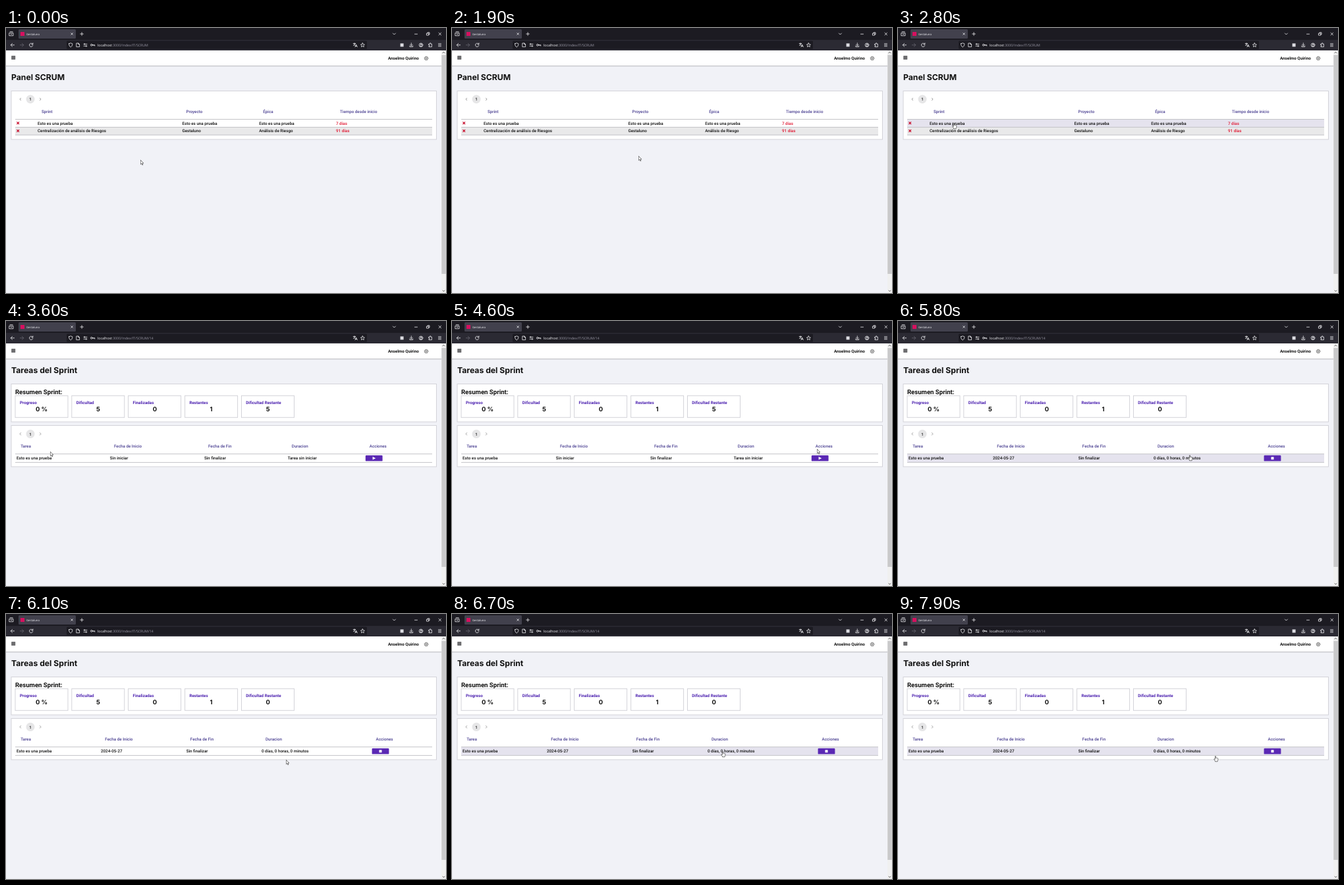
These frames come from a looping animation (668 px wide and 402 px high, 8 s). An HTML page:

```html
<!DOCTYPE html>
<html lang="es">
<head>
<meta charset="utf-8">
<title>Panel SCRUM</title>
<style>
html, body { margin: 0; width: 100%; height: 100%; overflow: hidden; background: #f1f2f7; }
svg { display: block; }
text { font: 500 6.26px Roboto, sans-serif; fill: #111; text-rendering: geometricPrecision; white-space: pre; }
.ui { font: 400 5.24px "Open Sans", sans-serif; fill: #9a99a6; }
.ui .on, .tab { fill: #fbfbfe; }
.tab { font: 400 4.2px "Open Sans", sans-serif; }
.title { font: 700 12.2px Inter, sans-serif; }
.sub { font: 700 9.6px Roboto, sans-serif; }
.head text, text.head { fill: #4b4192; }
.label { font-weight: 700; fill: #4d22b0; }
.num { font: 700 9.4px Inter, sans-serif; text-anchor: middle; }
.late { fill: #e0142f; }
.box { fill: #fff; stroke: #d3d3d9; }
.rule { stroke: #c4c4c8; fill: none; }
.icon { fill: none; stroke: #fbfbfe; stroke-width: .75; stroke-linecap: round; stroke-linejoin: round; }
.dim { stroke: #6b6a75; }
.hot { fill: #e5e3ee; }
.btn { fill: #5a28b4; }

.list, .before, .after, .task, .row1, .row2, .row3, .hand, .arrow, .mouse { animation: 8s step-end infinite; }
.list { animation-name: list; }
.task { animation-name: task; }
.before { animation-name: before; }
.after { animation-name: after; }
.row1 { animation-name: row1; }
.row2 { animation-name: row2; }
.row3 { animation-name: row3; }
.hand { animation-name: hand; }
.arrow { animation-name: arrow; }
.mouse { animation-name: mouse; }

@keyframes list { 0% { visibility: visible } 38.75%, 100% { visibility: hidden } }
@keyframes task { 0% { visibility: hidden } 38.75%, 100% { visibility: visible } }
@keyframes before { 0%, 65% { visibility: hidden } 38.75% { visibility: visible } 100% { visibility: hidden } }
@keyframes after { 0% { visibility: hidden } 65%, 100% { visibility: visible } }
@keyframes row1 { 0%, 38.75%, 100% { opacity: 0 } 32.5% { opacity: 1 } }
@keyframes row2 { 0%, 32.5%, 100% { opacity: 0 } 30% { opacity: 1 } }
@keyframes row3 {
  0%, 56.25%, 75%, 95% { opacity: 0 }
  50%, 61.25%, 78.75%, 96.25%, 100% { opacity: 1 }
}
@keyframes hand {
  0%, 38.75%, 56.25%, 75%, 95% { opacity: 0 }
  30%, 50%, 61.25%, 78.75%, 96.25%, 100% { opacity: 1 }
}
@keyframes arrow {
  0%, 38.75%, 56.25%, 75%, 95% { opacity: 1 }
  30%, 50%, 61.25%, 78.75%, 96.25%, 100% { opacity: 0 }
}
@keyframes mouse {
  0% { transform: translate(204px, 200px) }
  1.25% { transform: translate(204px, 200px); animation-timing-function: steps(3) }
  5% { transform: translate(297px, 200px) }
  10% { transform: translate(297px, 200px); animation-timing-function: steps(2) }
  12.5% { transform: translate(298px, 191px) }
  18.75% { transform: translate(294px, 191px) }
  21.25% { transform: translate(294px, 191px); animation-timing-function: steps(2) }
  23.75% { transform: translate(283px, 194px); animation-timing-function: steps(2) }
  26.25% { transform: translate(235px, 204px); animation-timing-function: steps(3) }
  30% { transform: translate(120px, 158px); animation-timing-function: steps(2) }
  32.5% { transform: translate(90px, 146px); animation-timing-function: steps(2) }
  35% { transform: translate(85px, 144px) }
  38.75% { transform: translate(85px, 144px); animation-timing-function: steps(5) }
  45% { transform: translate(67px, 198px); animation-timing-function: steps(2) }
  47.5% { transform: translate(70px, 196px); animation-timing-function: steps(2) }
  50% { transform: translate(110px, 207px); animation-timing-function: steps(4) }
  55% { transform: translate(470px, 209px); animation-timing-function: steps(2) }
  57.5% { transform: translate(554px, 194px) }
  58.75% { transform: translate(556px, 192px); animation-timing-function: steps(2) }
  61.25% { transform: translate(559px, 207px) }
  67.5% { transform: translate(559px, 207px); animation-timing-function: steps(2) }
  70% { transform: translate(530px, 206px); animation-timing-function: steps(2) }
  72.5% { transform: translate(443px, 203px); animation-timing-function: steps(3) }
  76.25% { transform: translate(425px, 221px); animation-timing-function: steps(4) }
  81.25% { transform: translate(412px, 206px); animation-timing-function: steps(2) }
  83.75% { transform: translate(411px, 208px) }
  87.5% { transform: translate(411px, 208px); animation-timing-function: steps(2) }
  90% { transform: translate(428px, 208px) }
  92.5% { transform: translate(428px, 208px); animation-timing-function: steps(2) }
  95% { transform: translate(455px, 196px); animation-timing-function: steps(3) }
  98.75%, 100% { transform: translate(482px, 215px) }
}
</style>
</head>
<body>
<svg width="668" height="402" viewBox="0 0 668 402">
  <defs>
    <g id="pager">
      <circle r="6.5" fill="#e6e6e7"/>
      <path d="M-14.2-2l-1.8 2 1.8 2M14.2-2l1.8 2-1.8 2" fill="none" stroke="#777" stroke-width=".7"/>
      <text y="2.2" text-anchor="middle" style="font-size:6px">1</text>
    </g>
    <path id="cross" d="M-1.8-1.8l3.6 3.6M1.8-1.8l-3.6 3.6" stroke="#c8102e" stroke-width="1.3"/>
    <rect id="stat" class="box" width="80" height="33"/>
  </defs>

  <!-- browser -->
  <rect width="668" height="18" fill="#1c1b22"/>
  <rect y="18" width="668" height="16" fill="#2b2a33"/>
  <rect x="19" y="2" width="87" height="14" rx="1.5" fill="#42414d"/>
  <rect x="92" y="19.5" width="456" height="12.5" rx="1.5" fill="#1c1b22"/>
  <rect x="22" y="6" width="6" height="6" fill="#d6105f"/>
  <text class="tab" x="31" y="10.6">Gestaluno</text>
  <text class="ui" x="139" y="27.8"><tspan class="on">localhost</tspan>:3000/Index/IT/SCRUM<tspan class="task">/14</tspan></text>
  <g class="icon">
    <path d="M5.2 7.5h5.8v4.2H5.2zM6 5.6h4.2M7.2 9.5h1.8"/>
    <path d="M98.8 7.6l2.6 2.6M101.4 7.6l-2.6 2.6M112.8 9h4.6M115.1 6.7v4.6"/>
    <path d="M587.4 8l2 2 2-2M620.5 9.2h4M638.8 8h3v3h-3zM640 8V6.8h3v3h-1.2M657 7.2l3.6 3.6M660.6 7.2L657 10.8"/>
    <path d="M12.6 25.8H7.2m2.4-2.4l-2.4 2.4 2.4 2.4"/>
    <path class="dim" d="M21.4 25.8h5.4m-2.4-2.4l2.4 2.4-2.4 2.4"/>
    <path d="M40.6 24.6a2.7 2.7 0 1 0 .2 2M40.9 22.8v2.1h-2.1"/>
    <path d="M95.6 23.8l2.6-1 2.6 1c0 2.6-.6 4-2.6 5.2-2-1.2-2.6-2.6-2.6-5.2z"/>
    <path d="M107.2 23h2.6l1.8 1.8v3.8h-4.4zM109.8 23v1.8h1.8"/>
    <path d="M118 24.4h5M119.2 23.4v2M118 27.3h5M121.8 26.3v2"/>
    <circle cx="129.8" cy="25.8" r="1.4"/><path d="M131.2 25.8h3.6v1.3M133.2 25.8v1"/>
    <path d="M527.2 23.6h3.6M529 22.8v.8M527.5 26.6c1.4-.6 2.3-1.6 2.6-3M528 24.6l2 1.8M530 28.8l1.6-3.8 1.6 3.8M530.6 27.5h2"/>
    <path d="M541.4 22.8l.9 1.9 2.1.3-1.5 1.5.4 2.1-1.9-1-1.9 1 .4-2.1-1.5-1.5 2.1-.3z"/>
    <path d="M615.3 22.8v4m-1.8-1.6l1.8 1.8 1.8-1.8M612.9 27v1.5h4.8V27"/>
    <circle cx="630" cy="25.8" r="2.8"/><circle cx="630" cy="25" r=".9"/><path d="M628.3 27.6q1.7-1.4 3.4 0"/>
    <path d="M642 24.2h1.5q-.4-1.6.7-1.6t.7 1.6h1.5v4.4H642v-1.4q1.4.2 1.4-.7t-1.4-.7z"/>
    <path d="M656.5 23.8h4M656.5 25.8h4M656.5 27.8h4"/>
  </g>
  <rect x="598.6" y="23.4" width="5" height="5" fill="#dcdce2"/>

  <!-- page frame -->
  <rect y="34" width="661" height="368" fill="#f1f2f7"/>
  <rect y="34" width="661" height="23" fill="#fff"/>
  <path d="M0 57.5h661" stroke="#c3c3c8"/>
  <path d="M0 58.5h661" stroke="#e6e7ec"/>
  <rect x="8.2" y="42" width="6" height="6" rx=".6" fill="#77777a"/>
  <path d="M8.2 44h6M8.2 46h6" stroke="#555" stroke-width=".6"/>
  <text x="626.8" y="48.2" text-anchor="end" style="font-weight:700">Anselmo Quirino</text>
  <g fill="none" stroke="#555">
    <circle cx="638" cy="46" r="2.3" stroke-width=".7"/>
    <circle cx="638" cy="46" r="2.9" stroke-width=".8" stroke-dasharray="1.14 1.14"/>
    <circle cx="638" cy="46" r=".9" stroke-width=".6"/>
  </g>
  <rect x="661" y="34" width="7" height="368" fill="#f0f0f0"/>
  <rect x="661.3" y="41" width="6.4" height="332" fill="#c9c9ca"/>
  <path d="M662.8 38.2l1.7-1.9 1.7 1.9M662.8 397.8l1.7 1.9 1.7-1.9" fill="none" stroke="#505050" stroke-width=".9"/>

  <!-- sprint list -->
  <g class="list">
    <text class="title" x="8" y="78.8">Panel SCRUM</text>
    <rect class="box" x="8" y="95.5" width="645.5" height="73.5"/>
    <use href="#pager" x="37" y="108"/>
    <text class="head" y="128.7"><tspan x="54">Sprint</tspan><tspan x="273.5">Proyecto</tspan><tspan x="390.3">Épica</tspan><tspan x="507">Tiempo desde inicio</tspan></text>
    <rect x="14" y="150.5" width="633" height="11.5" fill="#e9e9ea"/>
    <rect class="hot row1" x="14" y="139" width="633" height="11.5"/>
    <rect class="hot row2" x="14" y="150.5" width="633" height="11.5"/>
    <path class="rule" d="M14 138.5h633M14 150.5h633M14 162.3h633"/>
    <use href="#cross" x="18.2" y="144.2"/>
    <use href="#cross" x="18.2" y="156.1"/>
    <text y="146.6"><tspan x="48">Esto es una prueba</tspan><tspan x="267.4">Esto es una prueba</tspan><tspan x="384.2">Esto es una prueba</tspan><tspan class="late" x="501">7 días</tspan></text>
    <text y="158.4"><tspan x="48">Centralización de análisis de Riesgos</tspan><tspan x="267.4">Gestaluno</tspan><tspan x="384.2">Análisis de Riesgo</tspan><tspan class="late" x="501">91 días</tspan></text>
  </g>

  <!-- sprint tasks -->
  <g class="task">
    <text class="title" x="8" y="78.8">Tareas del Sprint</text>
    <rect class="box" x="8" y="95.5" width="645.5" height="57.5"/>
    <text class="sub" x="14" y="111">Resumen Sprint:</text>
    <use href="#stat" x="14" y="113.3"/>
    <use href="#stat" x="99.8" y="113.3"/>
    <use href="#stat" x="185.6" y="113.3"/>
    <use href="#stat" x="271.6" y="113.3"/>
    <use href="#stat" x="357.5" y="113.3"/>
    <text class="label" y="126"><tspan x="21">Progreso</tspan><tspan x="106.7">Dificultad</tspan><tspan x="192.5">Finalizadas</tspan><tspan x="278.4">Restantes</tspan><tspan x="364.2">Dificultad Restante</tspan></text>
    <g class="num-row">
      <text class="num" x="54" y="137">0 %</text>
      <text class="num" x="140" y="137">5</text>
      <text class="num" x="225.8" y="137">0</text>
      <text class="num" x="311.6" y="137">1</text>
    </g>
    <rect class="box" x="8" y="158.5" width="645.5" height="62.5"/>
    <use href="#pager" x="37" y="171.3"/>
    <rect class="hot row3" x="14" y="202" width="633" height="12.5"/>
    <path class="rule" d="M14 201.7h633M14 214.6h633"/>
    <text class="head" x="22.3" y="191.9">Tarea</text>
    <text x="16" y="210.3">Esto es una prueba</text>
  </g>
  <g class="before">
    <text class="num" x="397.6" y="137">5</text>
    <text class="head" y="191.9"><tspan x="164">Fecha de Inicio</tspan><tspan x="307">Fecha de Fin</tspan><tspan x="433.8">Duracion</tspan><tspan x="551.8">Acciones</tspan></text>
    <text y="210.3"><tspan x="157.8">Sin iniciar</tspan><tspan x="301">Sin finalizar</tspan><tspan x="427.7">Tarea sin iniciar</tspan></text>
    <rect class="btn" x="545.8" y="203.8" width="25.8" height="8.8" rx="1.2"/>
    <path d="M556.6 205.8l4.6 2.4-4.6 2.4z" fill="#fff"/>
  </g>
  <g class="after">
    <text class="num" x="397.6" y="137">0</text>
    <text class="head" y="191.9"><tspan x="150.3">Fecha de Inicio</tspan><tspan x="279.8">Fecha de Fin</tspan><tspan x="394">Duracion</tspan><tspan x="561.6">Acciones</tspan></text>
    <text y="210.3"><tspan x="144">2024-05-27</tspan><tspan x="273.7">Sin finalizar</tspan><tspan x="388">0 días, 0 horas, 0 minutos</tspan></text>
    <rect class="btn" x="555.6" y="203.8" width="25.8" height="8.8" rx="1.2"/>
    <rect x="566.5" y="206.2" width="4" height="4" fill="#fff"/>
  </g>

  <g class="mouse" fill="#fff" stroke="#222" stroke-width=".6" stroke-linejoin="round">
    <path class="arrow" d="M.3.3v6.6l1.5-1.4 1.1 2.4 1-.5-1.1-2.3h2z"/>
    <path class="hand" d="M-.6.9q.6-1 1.2 0v2.4q.6-.5 1.1.2.7-.5 1.1.3.9-.3 1 .6v1.8q0 1-.7 1.7v.9H-.5v-.8L-2.2 5.6q-.2-1 .8-.8l.8.7z"/>
  </g>
</svg>
</body>
</html>
```
